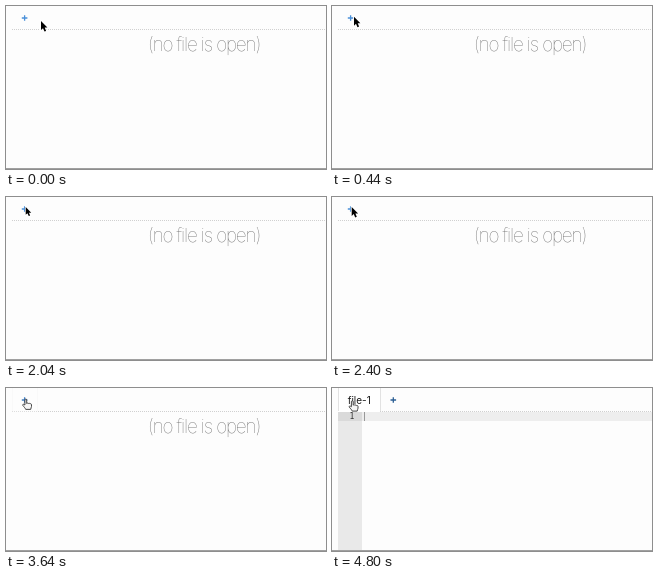
Animation, 320 px wide and 163 px high, one loop 7000 ms. Source, as an HTML page:

```html
<!DOCTYPE html>
<html lang="en">
<head>
<meta charset="utf-8">
<title>New file tab</title>
<style>
  html, body { margin: 0; width: 100%; height: 100%; overflow: hidden; background: #fdfdfd; }
  svg { display: block; width: 100%; height: 100%; }
  text { font-family: Inter, "Open Sans", sans-serif; }
  .hint { font-size: 19px; font-weight: 100; letter-spacing: -1.16px; fill: #6a6a6a; text-anchor: middle; }
  .name { font-size: 10px; fill: #181818; }
  .num { font: 8px "DejaVu Sans Mono", monospace; fill: #333; }
  .dots { stroke: #d0d0d0; stroke-dasharray: 1 1; }
  .edge { stroke: #e2e2e2; fill: none; }
  .faint { stroke: #f0f0f0; }
  .plus { stroke-width: 1.3; }
</style>
</head>
<body>
<svg viewBox="0 0 320 163">
  <rect width="320" height="163" fill="#fdfdfd"/>

  <g id="empty">
    <path class="dots" d="M6 23.5H320"/>
    <g id="hover">
      <path d="M6 0H32V24H6Z" fill="#fff"/>
      <path class="edge faint" d="M6.5 0V23M31.5 0V23"/>
    </g>
    <path id="add" class="plus" d="M15.8 12H21.4M18.6 9.2V14.8"/>
    <text class="hint" x="198.1" y="45">(no file is open)</text>
  </g>

  <g id="editor">
    <path class="dots" d="M48 23.5H320"/>
    <path d="M6 0H48V24H6Z" fill="#fff"/>
    <path class="edge" d="M6.5 0V23M48.5 0V23"/>
    <text class="name" x="15.7" y="15.5">file-1</text>
    <path class="plus" stroke="#2b5f94" d="M58.5 12H64.1M61.3 9.2V14.8"/>
    <path d="M6 24H30V162H6Z" fill="#e9e9e9"/>
    <path d="M6 24H30V33H6Z" fill="#dadada"/>
    <path d="M30 24H320V33H30Z" fill="#eee"/>
    <text class="num" x="17.6" y="31.3">1</text>
    <path stroke="#999" d="M32.5 24V33"/>
  </g>

  <path d="M0 162.5H320" stroke="#a0a0a0"/>

  <path id="arrow" d="M0 0V9L2 7.2L3.5 10.6L5.1 9.9L3.7 6.6H6.4Z" fill="#000" stroke="#fff" stroke-width="1.7" paint-order="stroke"/>
  <path id="hand" d="M3 6.5V1.5a.9.9 0 0 1 1.8 0V5c.3-.7 1.6-.6 1.7.1c.3-.5 1.5-.4 1.6.3c.4-.4 1.5-.1 1.5.7V8c0 1-.8 1.6-.8 2.9H3.8C3.4 9.6 2 8.4 .9 6.9c-.5-.8.5-1.5 1.2-.9Z"
    fill="#f6f6f6" stroke="#333" stroke-width=".9" stroke-linejoin="round"/>
</svg>
<script>
  const LOOP = 7000, TICK = 40, ARRIVED = 680, PRESS = 2040, RELEASE = 2120;
  const HAND = 3560, HOVERED = 3840, OPEN = 4800;
  const $ = id => document.getElementById(id);
  const [empty, editor, hover, add, arrow, hand] =
    ['empty', 'editor', 'hover', 'add', 'arrow', 'hand'].map($);

  const clamp = v => Math.max(0, Math.min(1, v));
  const mix = (a, b, p) => a + (b - a) * p;
  const show = (el, on) => el.setAttribute('visibility', on ? 'visible' : 'hidden');
  const place = (el, x, y, size = 1) =>
    el.setAttribute('transform', `translate(${x} ${y}) scale(${size})`);

  function draw(now) {
    const t = Math.floor(now % LOOP / TICK) * TICK;
    const open = t >= OPEN, pointing = t >= HAND;
    const pressed = t >= PRESS && t < RELEASE;
    const glide = Math.sin(clamp(t / ARRIVED) * Math.PI / 2);
    const p = clamp((t - HAND) / (HOVERED - HAND));

    show(empty, !open);
    show(editor, open);
    hover.setAttribute('opacity', p);
    add.setAttribute('stroke', `rgb(${mix(74, 35, p)},${mix(144, 82, p)},${mix(217, 135, p)})`);

    show(arrow, !pointing);
    show(hand, pointing);
    place(arrow, mix(35, 19.7, glide), mix(15, 9.9, glide), pressed ? .87 : 1);
    place(hand, mix(15.7, 16.4, p), mix(9.8, 12.2, p));
  }

  const start = performance.now();
  function frame(now) {
    draw(Math.max(0, now - start));
    requestAnimationFrame(frame);
  }
  draw(0);
  requestAnimationFrame(frame);
</script>
</body>
</html>
```
